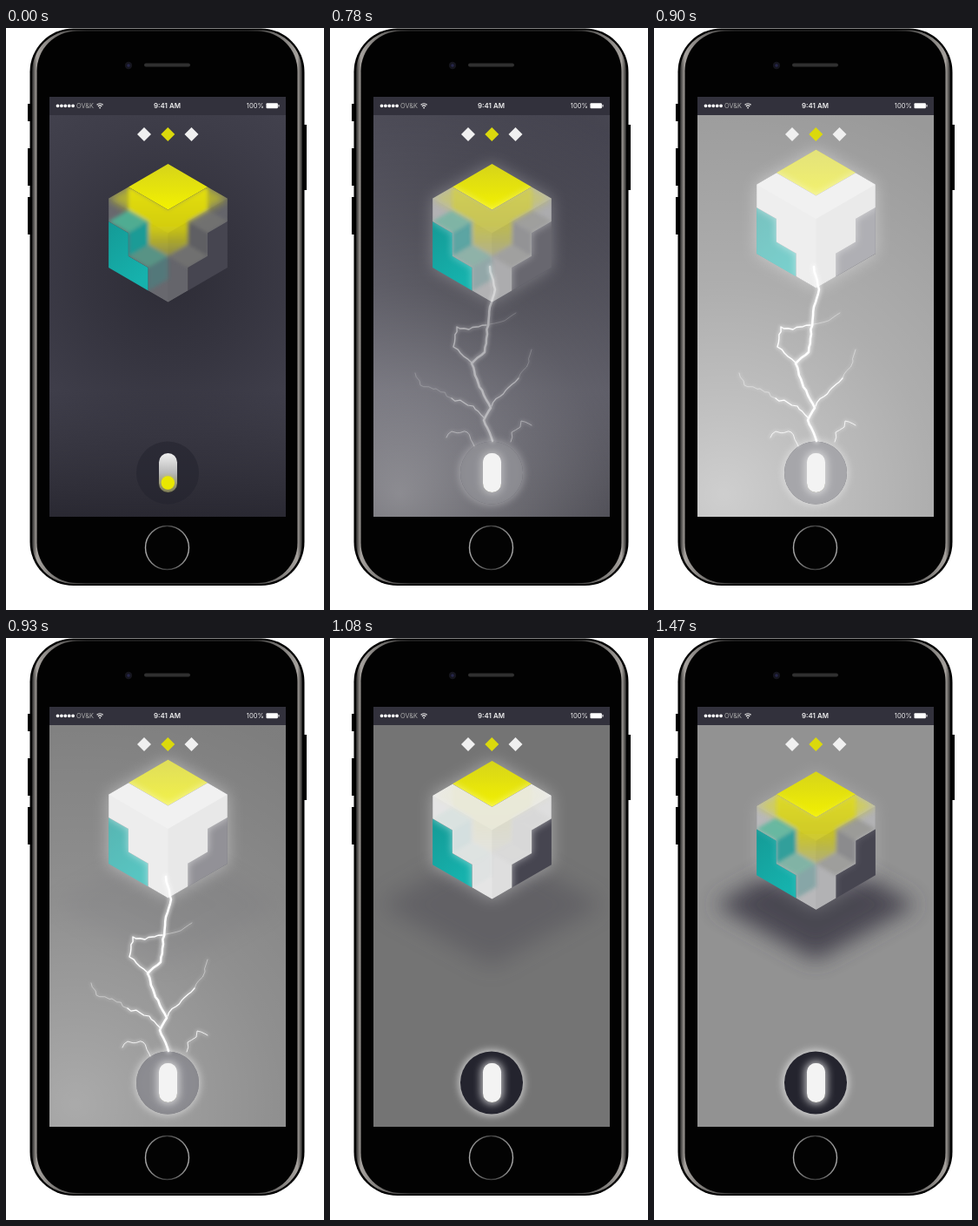
An HTML page for the animation above (1670 ms loop, 366 px wide and 668 px high).

```html
<!DOCTYPE html>
<html lang="en">
<head>
<meta charset="utf-8">
<title>Cube switch</title>
<style>
  html, body { margin: 0; width: 100%; height: 100%; overflow: hidden; background: #fff; }
  svg { display: block; width: 366px; height: 668px; }
  text { font-family: Inter, Roboto, sans-serif; fill: #eee; }
  #shadow { transform-origin: 186px 307px; }
  .room { x: 50px; y: 79px; width: 272px; height: 482px; }
</style>
</head>
<body>
<svg viewBox="0 0 366 668">
  <defs>
    <clipPath id="screen"><rect x="50" y="79" width="272" height="482"/></clipPath>
    <clipPath id="frostClip"><polygon data-iso="020 220 200 300 301 311 312 322 323 333 233 232 132 131 031 030"/></clipPath>
    <clipPath id="hexClip"><polygon data-iso="000 300 303 333 033 030"/></clipPath>
    <filter id="b2" x="-50%" y="-50%" width="200%" height="200%"><feGaussianBlur stdDeviation="2"/></filter>
    <filter id="b5" x="-100%" y="-50%" width="300%" height="200%"><feGaussianBlur stdDeviation="5"/></filter>
    <filter id="b9" x="-60%" y="-60%" width="220%" height="220%"><feGaussianBlur stdDeviation="9"/></filter>
    <filter id="b12" x="-40%" y="-60%" width="180%" height="220%"><feGaussianBlur stdDeviation="12"/></filter>
    <radialGradient id="night" gradientUnits="userSpaceOnUse" cx="186" cy="285" r="300">
      <stop offset="0" stop-color="#2d2c36"/><stop offset=".3" stop-color="#35343f"/>
      <stop offset=".6" stop-color="#3e3d49"/><stop offset="1" stop-color="#484753"/>
    </radialGradient>
    <linearGradient id="floor" x1="0" y1="0" x2="0" y2="1">
      <stop offset=".7" stop-color="#24232c" stop-opacity="0"/><stop offset="1" stop-color="#24232c" stop-opacity=".85"/>
    </linearGradient>
    <radialGradient id="light" gradientUnits="userSpaceOnUse" cx="80" cy="535" r="480">
      <stop offset="0" stop-color="#fff" stop-opacity=".9"/><stop offset=".2" stop-color="#fff" stop-opacity=".68"/>
      <stop offset=".5" stop-color="#fff" stop-opacity=".38"/><stop offset="1" stop-color="#fff" stop-opacity=".05"/>
    </radialGradient>
    <linearGradient id="lid" x1="0" y1="0" x2="0" y2="1">
      <stop offset="0" stop-color="#d6d41a"/><stop offset="1" stop-color="#f3f100"/>
    </linearGradient>
    <linearGradient id="core" x1="0" y1="0" x2="0" y2="1">
      <stop offset="0" stop-color="#e4df08"/><stop offset=".6" stop-color="#d3cd12"/>
      <stop offset="1" stop-color="#bdb82a" stop-opacity=".5"/>
    </linearGradient>
    <linearGradient id="teal" x1="0" y1="0" x2=".5" y2="1">
      <stop offset="0" stop-color="#149a96"/><stop offset="1" stop-color="#16b2ad"/>
    </linearGradient>
    <linearGradient id="pill" x1="0" y1="0" x2="0" y2="1">
      <stop offset="0" stop-color="#f0f0f0"/><stop offset=".5" stop-color="#b9b9b9"/><stop offset="1" stop-color="#77765a"/>
    </linearGradient>
    <linearGradient id="rim">
      <stop offset="0" stop-color="#222"/><stop offset=".009" stop-color="#6f6c69"/><stop offset=".018" stop-color="#a5a19d"/>
      <stop offset=".2" stop-color="#333"/><stop offset=".8" stop-color="#333"/>
      <stop offset=".982" stop-color="#a5a19d"/><stop offset=".991" stop-color="#6f6c69"/><stop offset="1" stop-color="#222"/>
    </linearGradient>
    <linearGradient id="home">
      <stop offset="0" stop-color="#aaa"/><stop offset=".5" stop-color="#3a3a3a"/><stop offset="1" stop-color="#aaa"/>
    </linearGradient>
  </defs>

  <!-- phone -->
  <path d="M27 87v20M27 138v43M27 194v43M344 111v75" stroke="#000" stroke-width="4"/>
  <rect x="27.5" y=".5" width="316" height="639.5" rx="50"/>
  <rect x="30" y="2.5" width="311" height="635.5" rx="48" fill="url(#rim)"/>
  <rect x="35.5" y="3.5" width="300" height="633.5" rx="46" fill="#020202"/>
  <rect x="159" y="40.5" width="53" height="4" rx="2" fill="#303030"/>
  <circle cx="141" cy="43" r="4.2" fill="#15151d"/><circle cx="141" cy="43" r="1.8" fill="#26264a"/>
  <circle cx="185.5" cy="596.5" r="25" fill="#030303" stroke="url(#home)" stroke-width="1.4"/>

  <g clip-path="url(#screen)">
    <rect class="room" fill="url(#night)"/>
    <rect class="room" fill="url(#floor)"/>
    <rect class="room" id="room"/>
    <polygon id="shadow" points="186,242 302,306 186,370 70,306" fill="#42414b" filter="url(#b12)"/>
    <rect class="room" id="flash" fill="url(#light)"/>

    <!-- status bar -->
    <rect x="50" y="79" width="272" height="21" fill="#32313c"/>
    <path d="M59.5 89.3h18" stroke="#fff" stroke-width="3.8" stroke-linecap="round" stroke-dasharray="0 4.4"/>
    <text x="81" y="92" font-size="7.4" style="fill:#aaa">OV&amp;K</text>
    <path d="M104.6 88.2a5 5 0 0 1 7 0M106 90a3 3 0 0 1 4.2 0" fill="none" stroke="#eee" stroke-width="1.2"/>
    <circle cx="108.1" cy="91.6" r=".9" fill="#eee"/>
    <text x="185.5" y="92" font-size="7.9" font-weight="600" text-anchor="middle">9:41 AM</text>
    <text x="297" y="92" font-size="7.6" text-anchor="end">100%</text>
    <rect x="299.5" y="86.3" width="13.4" height="6" rx="1" fill="#fff"/><path d="M314 88v2.6" stroke="#fff"/>

    <!-- page marks -->
    <path d="M159 114l8 8-8 8-8-8zM213.5 114l8 8-8 8-8-8z" fill="#f0f0f0"/>
    <path d="M186.3 114l8 8-8 8-8-8z" fill="#dbd90c"/>

    <g id="cube">
      <polygon id="halo" data-iso="000 300 303 333 033 030" fill="#fff" filter="url(#b9)"/>
      <polygon data-iso="000 200 220 020" fill="url(#lid)"/>
      <polygon data-iso="031 131 132 232 233 033" fill="url(#teal)"/>
      <polygon data-iso="301 311 312 322 323 303" fill="#464550"/>
      <polygon id="rightLit" data-iso="301 311 312 322 323 303" fill="#85858c"/>
      <g clip-path="url(#hexClip)">
        <polygon id="edge" data-iso="020 220 200 300 301 311 312 322 323 333 233 232 132 131 031 030" fill="#fff" filter="url(#b5)"/>
      </g>
      <g clip-path="url(#frostClip)">
        <polygon data-iso="000 300 303 333 033 030" fill="#58585e"/>
        <polygon id="milk" data-iso="000 300 303 333 033 030" fill="#f0f0f0"/>
        <g id="tint">
          <polygon data-iso="000 300 330 030" fill="#e0dc10" opacity=".6" filter="url(#b5)"/>
          <g filter="url(#b2)">
            <polygon data-iso="020 220 200 201 211 212 222 122 121 021" fill="url(#core)"/>
            <polygon data-iso="021 121 131 031" fill="#4dbd9c" opacity=".85"/>
            <polygon data-iso="131 121 122 132" fill="#1d9f9a"/>
            <polygon data-iso="122 222 232 132" fill="#4fb497" opacity=".6"/>
            <polygon data-iso="232 222 223 233" fill="#3a8f8b" opacity=".45"/>
            <polygon data-iso="201 301 311 211" fill="#85857c" opacity=".5"/>
            <polygon data-iso="311 211 212 312" fill="#5d5d60" opacity=".5"/>
            <polygon data-iso="212 312 322 222" fill="#85857c" opacity=".45"/>
          </g>
        </g>
        <polygon data-iso="030 330 333 033" opacity=".025"/>
        <polygon data-iso="300 330 333 303" opacity=".055"/>
      </g>
      <polygon id="veil" data-iso="000 300 303 333 033 030" fill="#f2f2f2"/>
    </g>

    <!-- switch -->
    <circle id="ring" cx="186" cy="510.5" r="37" fill="#fff" filter="url(#b5)"/>
    <circle id="button" cx="186" cy="510.5" r="36" fill="#24242e"/>
    <circle id="buttonLit" cx="186" cy="510.5" r="36" fill="#a6a6aa"/>
    <rect id="pillGlow" x="174" y="486" width="25" height="49" rx="12.5" fill="#fff" filter="url(#b5)"/>
    <rect x="176" y="488" width="21" height="45" rx="10.5" fill="url(#pill)"/>
    <g id="knob">
      <circle cx="186.3" cy="522" r="8" fill="#e8e600" opacity=".4" filter="url(#b2)"/>
      <circle cx="186.3" cy="522" r="7.7" fill="#e9e700"/>
    </g>
    <rect id="pillLit" x="176" y="488" width="21" height="45" rx="10.5" fill="#f3f3f3"/>

    <g id="bolt" fill="none" stroke="#fff" stroke-linejoin="round" stroke-linecap="round"></g>
  </g>
</svg>

<script>
const LOOP = 1670, STEP = 30, END = 1470;
const $ = id => document.getElementById(id);

// Isometric 3x3x3 grid: digits are steps right, left and down.
const iso = ([a, b, c]) =>
  `${186.5 + (a - b) * 22.8},${156 + (+a + +b) * 13.2 + c * 26.5}`;

for (const el of document.querySelectorAll('[data-iso]')) {
  el.setAttribute('points', el.dataset.iso.split(' ').map(iso).join(' '));
}

// Lightning: key points joined by a seeded, jagged line.
let seed = 7;
const jitter = size => {
  seed = (seed * 16807) % 2147483647;
  return (seed / 2147483647 - 0.5) * size;
};

function jag(keys, size) {
  const pts = keys.split(' ').map(p => p.split(',').map(Number));
  const out = [pts[0]];
  for (let i = 1; i < pts.length; i++) {
    const [x0, y0] = pts[i - 1], [x1, y1] = pts[i];
    const n = Math.max(1, Math.round(Math.hypot(x1 - x0, y1 - y0) / 5));
    for (let k = 1; k < n; k++) {
      out.push([x0 + (x1 - x0) * k / n + jitter(size), y0 + (y1 - y0) * k / n + jitter(size)]);
    }
    out.push([x1, y1]);
  }
  return out.map(p => p.map(v => v.toFixed(1)).join()).join(' ');
}

function strike(keys, width, opacity = 1, size = 3) {
  const points = jag(keys, size);
  const line = (w, o, extra = '') =>
    `<polyline points="${points}" stroke-width="${w}" opacity="${o}" ${extra}/>`;
  $('bolt').innerHTML += line(width * 2.3, opacity / 2, 'filter="url(#b2)"') + line(width, opacity);
}

strike('184,274 190,300 184,320 178,372 163,385 172,412 185,436 177,450 187,474', 2.5, 1, 1.5);
strike('163,384 150,373 142,366 146,343 160,346 180,341', 1.4);
strike('180,341 205,333 214,327', 0.7, 0.55);
strike('186,434 205,413 217,402', 1.2);
strike('217,402 229,383 232,369', 0.7, 0.6);
strike('177,447 165,434 140,425', 1.2);
strike('140,425 122,414 104,410 98,396', 0.7, 0.6);
strike('208,475 209,464 219,458 220,451 232,456', 1, 0.8);
strike('134,470 140,463 158,464 166,480', 1, 0.8);

const ramp = (t, from, to) => Math.min(1, Math.max(0, (t - from) / (to - from)));

function draw(time) {
  const t = Math.min(END, Math.floor(time % LOOP / STEP) * STEP);

  const slide = ramp(t, 600, 750) ** 1.5;
  const on = ramp(t, 720, 810);
  const whiten = ramp(t, 690, 850);
  const blaze = ramp(t, 810, 900);
  const fall = ramp(t, 900, 990);
  const dawn = ramp(t, 990, 1140);
  const settle = ramp(t, 990, END) ** 1.4;
  const lit = on * (1 - fall);

  const lift = 16.2 * blaze ** 0.8 - 13.4 * settle;
  const grey = 150 - 80 * fall + 76 * dawn;
  $('cube').style.transform = `translateY(${-lift}px)`;
  $('knob').style.transform = `translateY(${-24 * slide}px)`;
  $('shadow').style.transform = `scale(${1.12 - 0.12 * settle})`;
  $('room').style.fill = `rgb(${grey},${grey},${grey})`;

  const opacity = {
    room: blaze,
    flash: ramp(t, 750, 810) * (1 - 0.4 * blaze) * (1 - fall),
    shadow: 0.3 * fall + 0.6 * settle,
    bolt: ramp(t, 750, 810) * (1 - ramp(t, 930, 990)),
    halo: 0.4 * on - 0.2 * settle,
    edge: 0.55 * on - 0.4 * settle,
    rightLit: lit * 0.8,
    milk: 0.12 + 0.88 * whiten - 0.34 * settle,
    tint: 1 - ramp(t, 690, 900) + 0.85 * settle,
    veil: 0.45 * ramp(t, 780, 900) * (1 - fall),
    ring: 0.5 * on + 0.25 * fall,
    button: 0.55 + 0.45 * fall,
    buttonLit: lit,
    pillGlow: 0.6 * on + 0.15 * fall,
    knob: 1 - ramp(t, 750, 780),
    pillLit: ramp(t, 720, 780)
  };
  for (const id in opacity) $(id).style.opacity = opacity[id];
}

function tick() {
  draw(performance.now() - start);
  requestAnimationFrame(tick);
}

const start = performance.now();
tick();
</script>
</body>
</html>
```
